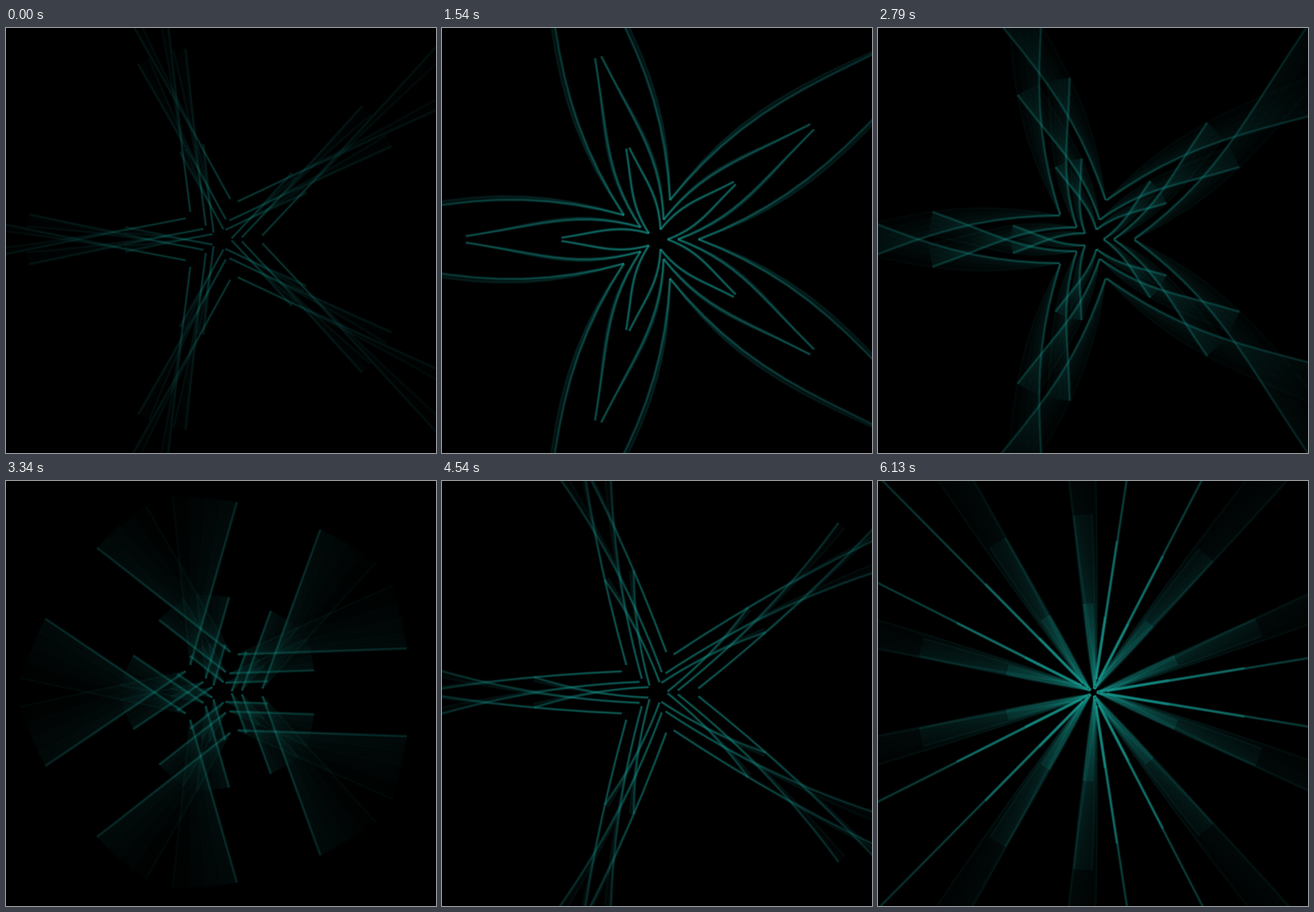
Recreate the animation shown at these times as an HTML page with a canvas. Size 753x744 px, loop 6.17 s.

```html
<!DOCTYPE html>
<html lang="en">
<head>
<meta charset="utf-8">
<title>Kaleidoscope strands</title>
<style>
html, body { margin: 0; width: 100%; height: 100%; overflow: hidden; background: #000; }
canvas { display: block; }
</style>
</head>
<body>
<canvas id="stage" width="753" height="744"></canvas>
<script>
const ctx = document.getElementById('stage').getContext('2d');
const WIDTH = 753, HEIGHT = 744, LOOP = 6170;
const FOLDS = 5, SEGMENTS = 14, RAYS = 13, VEIL_LAYERS = 4;

const mix = (a, b, k) => a + (b - a) * k;
const mixAll = (a, b, k) => Object.fromEntries(Object.keys(a).map(key => [key, mix(a[key], b[key], k)]));
const ease = (from, to, t) => {
  const k = Math.min(1, Math.max(0, (t - from) / (to - from)));
  return k * k * (3 - 2 * k);
};

// A strand turns from one heading to another (degrees from its axis), with an optional sway.
const strand = (from, to, length, extra) =>
  ({ from, to, length, sway: 0, peak: .5, side: 1, root: 18, ...extra });
const turn = (s, from, to = from) => ({ ...s, from: s.from + from, to: s.to + to });

function pathOf({ from, to, length, sway, peak, side, root }) {
  let x = root, y = root * .095 * side;
  const path = [[x, y]], step = length / SEGMENTS;
  for (let i = 0; i < SEGMENTS; i++) {
    const s = (i + .5) / SEGMENTS;
    const heading = mix(from, to, s) + sway * Math.cos(1.7 * Math.PI * (s - peak));
    x += Math.cos(heading * Math.PI / 180) * step;
    y += Math.sin(heading * Math.PI / 180) * step;
    path.push([x, y]);
  }
  return path;
}

// A fan spans two strands; its light is split into edges, fine rays and a veil.
const fan = (near, far, edge, farEdge, rays, veil) => ({ near, far, light: { edge, farEdge, rays, veil } });

const cross = strand(47, 48, 156);
const blade = strand(51, 51, 102);
const petal = strand(5, 46, 205, { sway: 11, peak: .6, side: -1 });
const wing = strand(70, 70, 74);
const arm = strand(38.5, 54, 204);
const curl = strand(0, 0, 92, { sway: 40, peak: .36, side: -1 });
const spoke = strand(9.3, 9.3, 128, { root: 6 });

const poses = [
  { at: 0, fan: fan(cross, turn(cross, 0, -8), .17, .1, .015, .04) },
  { at: 960, fan: fan(blade, turn(blade, -8), .5, .4, .03, .3) },
  { at: 2090, fan: fan(petal, turn(petal, 2, 14), .5, .02, .02, .24) },
  { at: 3340, fan: fan(wing, turn(wing, -22), .34, .06, .02, .13) },
  { at: 4540, fan: fan(arm, turn(arm, 0, -4), .44, .1, .02, .09) },
  { at: 5540, fan: fan(curl, arm, .46, .46, .13, .1) },
  { at: 6130, fan: fan(spoke, spoke, .62, 0, 0, 0) }
];

function poseAt(time) {
  const t = Math.min(time, poses[poses.length - 1].at);
  const next = Math.max(1, poses.findIndex(p => p.at >= t));
  const a = poses[next - 1], b = poses[next];
  const k = (t - a.at) / (b.at - a.at);
  return Object.fromEntries(['near', 'far', 'light'].map(key => [key, mixAll(a.fan[key], b.fan[key], k)]));
}

// The late burst of rays, which gathers into narrow bands.
function burstAt(time) {
  const bloom = ease(4700, 5540, time), gather = ease(5540, 6130, time);
  const root = mix(14, 6, gather), length = mix(190, 150, gather);
  return fan(
    strand(mix(48, 27, gather), mix(40, 23, gather), length, { root }),
    strand(mix(-8, 17, gather), mix(-4, 21, gather), length, { root }),
    .18 * gather, .08 * gather, bloom * mix(.2, .1, gather), bloom * mix(.3, .08, gather));
}

function falloff(...alphas) {
  const gradient = ctx.createRadialGradient(0, 0, 0, 0, 0, 520);
  alphas.forEach((a, i) => gradient.addColorStop(i / (alphas.length - 1), `rgba(20,${150 - i * 5},${140 - i * 3},${a})`));
  return gradient;
}
const glow = falloff(1, .85, .65, .5);
const haze = falloff(1, .7, .45, .3);

function trace(path, scale) {
  for (const [x, y] of path) ctx.lineTo(x * scale, y * scale);
}

function strokePath(path, scale, alpha, width) {
  if (alpha < .004) return;
  ctx.globalAlpha = alpha;
  ctx.lineWidth = width;
  ctx.beginPath();
  trace(path, scale);
  ctx.stroke();
}

// Paths are shared by all mirrored copies of a fan.
function prepare({ near, far, light }) {
  const between = count => Array.from({ length: count }, (_, k) => pathOf(mixAll(near, far, (k + 1) / count)));
  return { near: pathOf(near), far: pathOf(far), rays: between(RAYS), layers: between(VEIL_LAYERS), light };
}

function drawFan({ near, far, rays, layers, light }, scale) {
  ctx.fillStyle = ctx.strokeStyle = haze;
  if (light.veil > .004) {
    ctx.globalAlpha = light.veil / VEIL_LAYERS;
    for (const layer of layers) {
      ctx.beginPath();
      trace(near, scale);
      trace([...layer].reverse(), scale);
      ctx.fill();
    }
  }
  for (const ray of rays) strokePath(ray, scale, light.rays, 1.8);
  ctx.strokeStyle = glow;
  for (const [path, alpha] of [[near, light.edge], [far, light.farEdge]]) {
    strokePath(path, scale, alpha * .4, 5.5);
    strokePath(path, scale, alpha * .7, 2.8);
  }
}

function draw(time) {
  ctx.setTransform(1, 0, 0, 1, 0, 0);
  ctx.globalAlpha = 1;
  ctx.fillStyle = '#000';
  ctx.fillRect(0, 0, WIDTH, HEIGHT);
  ctx.lineJoin = 'round';
  const fans = [burstAt(time), poseAt(time)].map(prepare);
  for (const f of fans) {
    for (let fold = 0; fold < FOLDS; fold++) {
      for (const side of [1, -1]) {
        ctx.setTransform(1, 0, 0, 1, 377, 370);
        ctx.rotate(fold * 2 * Math.PI / FOLDS);
        ctx.scale(1, side);
        for (const scale of [4, 2, 1]) drawFan(f, scale);
      }
    }
  }
}

const start = performance.now();
function tick() {
  draw((performance.now() - start) % LOOP);
  requestAnimationFrame(tick);
}
tick();
</script>
</body>
</html>
```
